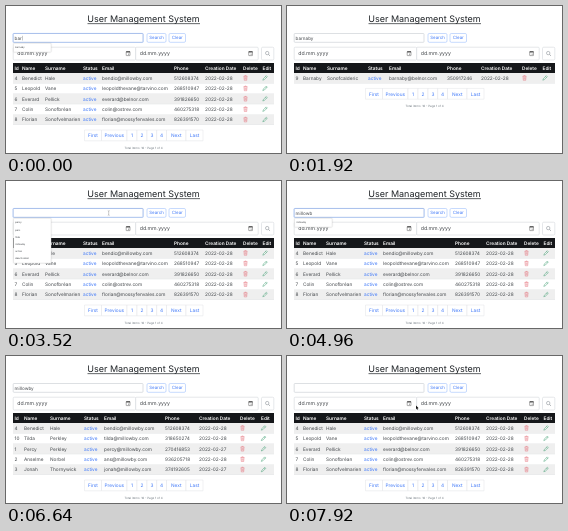
Recreate the animation shown at these times as an HTML page with a canvas. Size 275x147 px, loop 8 s.

```html
<!DOCTYPE html>
<html lang="en">
<head>
<meta charset="utf-8">
<title>User Management System</title>
<style>
html, body { margin: 0; width: 100%; height: 100%; overflow: hidden; background: #fff; }
canvas { display: block; width: 275px; height: 147px; }
</style>
</head>
<body>
<canvas id="stage"></canvas>
<script>
const W = 275, H = 147, LOOP = 8000;
const BLUE = '#0d6efd', LINK = '#3f78f8', SOFT_BLUE = '#8fb4fa';
const INK = '#212529', BODY = '#43474b', DARK = '#15171a', LINE = '#e0e3e6', FIELD = '#d3d7dc';
const FONT = 'Inter, "Liberation Sans", sans-serif';
const canvas = document.getElementById('stage');
const scale = Math.max(1, window.devicePixelRatio || 1);
canvas.width = W * scale;
canvas.height = H * scale;
const ctx = canvas.getContext('2d');

const HEAD = ['Id', 'Name', 'Surname', 'Status', 'Email', 'Phone', 'Creation Date', 'Delete', 'Edit'];
const DAY = '2022-02-28';
const benedict = [4, 'Benedict', 'Hale', 'bendic@millowby.com', '512608374', DAY];

// Each view: column positions and rows of id, name, surname, email, phone, date
const views = {
  all: {
    cols: [8.5, 16, 39, 77, 96, 168, 199, 237, 256.5],
    rows: [
      benedict,
      [5, 'Leopold', 'Vane', 'leopoldthevane@tarvino.com', '268510947', DAY],
      [6, 'Everard', 'Pellick', 'everard@belnor.com', '391826650', DAY],
      [7, 'Colin', 'Sonofbréan', 'colin@ostrev.com', '460275318', DAY],
      [8, 'Florian', 'Sonofvelmarien', 'florian@mossyfenvales.com', '826391570', DAY]
    ]
  },
  one: {
    cols: [8.5, 16, 40, 81, 102, 160, 194, 235, 255.5],
    rows: [[9, 'Barnaby', 'Sonofcalderic', 'barnaby@belnor.com', '350917246', DAY]]
  },
  town: {
    cols: [8.5, 18, 44, 78, 98, 159, 193, 234, 255],
    rows: [
      benedict,
      [10, 'Tilda', 'Perkley', 'tilda@millowby.com', '318650274', DAY],
      [1, 'Percy', 'Perkley', 'percy@millowby.com', '270416853', '2022-02-27'],
      [2, 'Anselme', 'Norbel', 'ans@millowby.com', '936205718', DAY],
      [3, 'Jonah', 'Thornywick', 'jonah@millowby.com', '374192605', '2022-02-27']
    ]
  }
};
const HINTS = ['percy', 'perc', 'tilda', 'millowby', 'active', 'deactivated'];
const PAGES = [['First', 17], ['Previous', 25.5], ['1', 10], ['2', 10], ['3', 9.7], ['4', 9.8], ['Next', 19.5], ['Last', 17]];

function text(str, x, y, size = 4.75, color = INK, weight = 400, align = 'left') {
  ctx.font = `${weight} ${size}px ${FONT}`;
  ctx.fillStyle = color;
  ctx.textAlign = align;
  ctx.fillText(str, x, y);
}

function box(x, y, w, h, r, stroke, fill, line = 0.6) {
  ctx.beginPath();
  ctx.roundRect(x, y, w, h, r);
  if (fill) { ctx.fillStyle = fill; ctx.fill(); }
  if (stroke) { ctx.strokeStyle = stroke; ctx.lineWidth = line; ctx.stroke(); }
}

function path(color, width, ...lines) {
  ctx.strokeStyle = color;
  ctx.lineWidth = width;
  ctx.beginPath();
  for (const pts of lines) {
    for (let i = 0; i < pts.length; i += 2) {
      if (i) ctx.lineTo(pts[i], pts[i + 1]);
      else ctx.moveTo(pts[i], pts[i + 1]);
    }
  }
  ctx.stroke();
}

function rect(x, y, w, h, color) {
  ctx.fillStyle = color;
  ctx.fillRect(x, y, w, h);
}

const ease = u => u * u * (3 - 2 * u);
const part = (t, a, b) => Math.min(1, Math.max(0, (t - a) / (b - a)));
const typed = (word, t, start, step, had = 0) =>
  word.slice(0, Math.max(0, had + Math.floor((t - start) / step) + 1));

function stateAt(t) {
  const s = { view: 'all', query: '', focus: false, hints: [], pressed: 0 };
  if (t < 2920) {
    s.query = t < 180 ? 'bar' : typed('barnaby', t, 180, 160, 3);
    s.focus = t < 960;
    if (s.focus) s.hints = ['barnaby'];
    if (t >= 1260) s.view = 'one';
  } else if (t >= 3400 && t < 7680) {
    s.query = t < 4200 ? '' : typed('millowby', t, 4200, 120);
    s.focus = t < 5200;
    if (s.focus) s.hints = s.query ? ['millowby'] : HINTS;
    if (t >= 5440) s.view = 'town';
  }
  s.pressed = t < 4000 ? part(t, 2560, 2680) * (1 - part(t, 2920, 3080))
                       : part(t, 7520, 7600) * (1 - part(t, 7700, 7840));
  return s;
}

function drawTitle() {
  text('User Management System', 137.5, 16, 9, INK, 400, 'center');
  rect(81.5, 17.4, 112.5, 0.7, INK);
}

function drawButton(label, x, w) {
  box(x, 27.5, w, 8.8, 1.3, SOFT_BLUE, '#fff', 0.5);
  text(label, x + w / 2, 33.4, 4.4, LINK, 400, 'center');
}

function drawSearch(s, t) {
  if (s.focus) box(7, 27.3, 130.2, 9.2, 1, 'rgba(13,110,253,.12)', null, 1.2);
  box(7.2, 27.5, 129.8, 8.8, 0.8, s.focus ? '#7f9fe0' : '#c6cbd0', '#fff', 0.6);
  text(s.query, 8.6, 33.5, 4.6, BODY);
  if (s.focus && t % 1000 < 500) {
    const x = 8.9 + ctx.measureText(s.query).width;
    rect(x, 29.8, 0.3, 4.6, BODY);
  }
  drawButton('Search', 141, 19);
  drawButton('Clear', 163, 16.5);
  if (s.pressed) {
    ctx.globalAlpha = s.pressed;
    box(162.5, 27, 17.5, 9.8, 1.6, 'rgba(13,110,253,.5)', null, 1.4);
    box(163, 27.5, 16.5, 8.8, 1.3, BLUE, BLUE, 0.5);
    text('Clear', 171.2, 33.4, 4.4, '#fff', 400, 'center');
    ctx.globalAlpha = 1;
  }
}

function drawDates() {
  for (const x of [7.2, 129.7]) {
    box(x, 41.2, 122.5, 12.8, 1, FIELD, '#fff');
    text('dd.mm.yyyy', x + 4, 49.4, 5.2, BODY);
    box(x + 113, 45.6, 3.8, 4, 0.3, '#444', null, 0.45);
    rect(x + 113, 45.4, 3.8, 1, '#333');
    rect(x + 115, 47.7, 0.9, 0.9, '#555');
  }
  box(255.5, 41.2, 12.3, 12.8, 1.2, FIELD, '#fff');
  ctx.beginPath();
  ctx.arc(261.2, 47.1, 1.7, 0, 7);
  ctx.strokeStyle = '#7b8288';
  ctx.lineWidth = 0.5;
  ctx.stroke();
  path('#7b8288', 0.6, [262.4, 48.3, 264, 49.9]);
}

function drawBin(x, y) {
  path('#e2606d', 0.42,
    [x - 1.9, y - 1.7, x + 1.9, y - 1.7],
    [x - 0.7, y - 1.8, x - 0.7, y - 2.4, x + 0.7, y - 2.4, x + 0.7, y - 1.8],
    [x - 1.5, y - 1.7, x - 1.2, y + 2.3, x + 1.2, y + 2.3, x + 1.5, y - 1.7],
    [x - 0.4, y - 0.8, x - 0.4, y + 1.5], [x + 0.5, y - 0.8, x + 0.5, y + 1.5]);
}

function drawPencil(x, y) {
  path('#3d9c70', 0.48,
    [x - 2.2, y + 2.2, x - 1.6, y + 0.6, x + 1.3, y - 2.3, x + 2.3, y - 1.3, x - 0.6, y + 1.6, x - 2.2, y + 2.2],
    [x + 0.5, y - 1.5, x + 1.5, y - 0.5]);
}

function drawTable({ cols, rows }) {
  const top = 67, step = 10.4;
  rect(7, 57, 261, 10, DARK);
  HEAD.forEach((h, i) => text(h, cols[i], 63.7, 4.75, '#fff', 600));
  rows.forEach(([id, name, surname, email, phone, date], i) => {
    const y = top + i * step;
    if (i % 2 === 0) rect(7, y, 261, step, '#efefef');
    rect(7, y + step - 0.4, 261, 0.4, LINE);
    [id, name, surname, 'active', email, phone, date].forEach((v, c) =>
      text(String(v), cols[c], y + 6.8, 4.75, c === 3 ? LINK : BODY));
    drawBin(cols[7] + 2.5, y + 5);
    drawPencil(cols[8] + 2.5, y + 5);
  });
  return top + rows.length * step;
}

function drawPages(y) {
  let x = 78.5;
  for (const [label, w] of PAGES) {
    box(x, y + 5, w, 10.8, 0, LINE, '#fff', 0.5);
    text(label, x + w / 2, y + 12.1, 4.75, LINK, 400, 'center');
    x += w;
  }
  text('Total items: 16 - Page 1 of 4', 137.5, y + 23.8, 2.95, '#6c757d', 400, 'center');
}

function drawHints(list) {
  if (!list.length) return;
  const pitch = 7.2, h = 1.6 + list.length * pitch;
  ctx.shadowColor = 'rgba(0,0,0,.18)';
  ctx.shadowBlur = 2 * scale;
  box(7.6, 37.3, 37.4, h, 0.6, null, '#fff');
  ctx.shadowBlur = 0;
  box(7.6, 37.3, 37.4, h, 0.6, '#d8d8d8', null, 0.4);
  list.forEach((v, i) => text(v, 9.2, 42.3 + i * pitch, 2.4, BODY));
}

function drawBeam(x, y) {
  path('#888', 0.45,
    [x, y - 2, x, y + 2],
    [x - 0.9, y - 2.4, x, y - 2, x + 0.9, y - 2.4],
    [x - 0.9, y + 2.4, x, y + 2, x + 0.9, y + 2.4]);
}

function drawArrow(x, y) {
  ctx.beginPath();
  [[0, 0], [0, 3.8], [0.9, 3], [1.5, 4.3], [2.1, 4], [1.5, 2.8], [2.7, 2.7]]
    .forEach(([dx, dy]) => ctx.lineTo(x + dx, y + dy));
  ctx.closePath();
  ctx.fillStyle = '#111';
  ctx.fill();
}

function drawPointer(t) {
  if (t >= 2680 && t < 4200) {
    const x = 171 - 53 * ease(part(t, 2680, 2800)) - 15.3 * ease(part(t, 2800, 3360));
    if (x < 137) drawBeam(x, 32);
    else drawArrow(x, 32);
  } else if (t >= 7560) {
    const u = ease(part(t, 7640, 7900));
    drawArrow(171 - 42 * u, 33 + 16.5 * u);
  }
}

function draw(t) {
  const s = stateAt(t);
  ctx.setTransform(scale, 0, 0, scale, 0, 0);
  ctx.textRendering = 'geometricPrecision';
  rect(0, 0, W, H, '#fff');
  drawTitle();
  drawSearch(s, t);
  drawDates();
  drawPages(drawTable(views[s.view]));
  drawHints(s.hints);
  drawPointer(t);
}

function tick() {
  draw(performance.now() % LOOP);
  requestAnimationFrame(tick);
}
tick();
</script>
</body>
</html>
```
